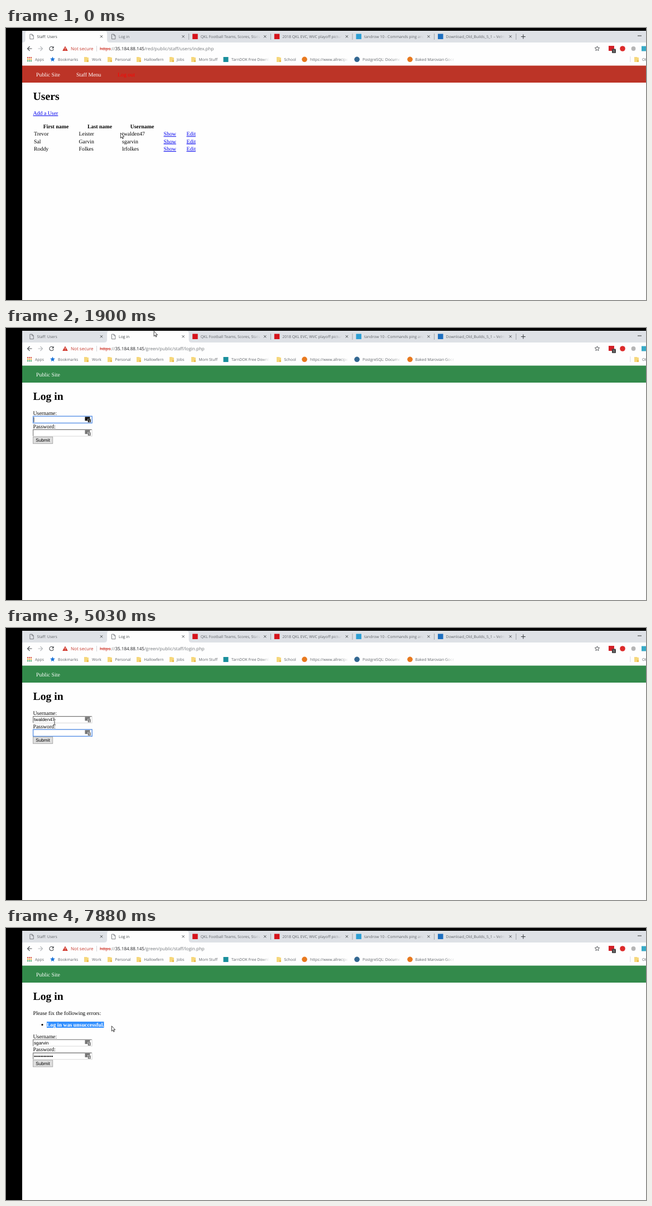
These frames come from a looping animation (1147 px wide and 488 px high, 8000 ms). An HTML page:

```html
<!DOCTYPE html>
<html lang="en">
<head>
<meta charset="utf-8">
<title>Staff login</title>
<style>
  html, body { margin: 0; width: 100%; height: 100%; overflow: hidden; background: #000; }
  svg { display: block; }
  #stage { width: 100%; height: 100%; }
  text { text-rendering: geometricPrecision; white-space: pre; }
  .ui { font-family: "Open Sans", "Noto Sans", sans-serif; }
  .page { font-family: "Liberation Serif", "Times New Roman", serif; }
  .field { font-family: "Liberation Sans", Arial, sans-serif; }
  .bold { font-weight: bold; }
  .link { text-decoration: underline; }
</style>
</head>
<body>
<svg id="stage" viewBox="0 0 1147 488"></svg>
<script>
const LOOP = 8000;
const BODY = 9.86, FIELD = 8.2, TAB = 6.85, MARK = 6.9, URL_SIZE = 8.06;
const SELECT = '#3390ff', GREY = '#5f6368';
const LOGIN_USER = 'twalden47', SAVED_USER = 'sgarvin';
const ERROR = 'Log in was unsuccessful.';

const TABS = [
  ['', 'Staff: Users'],
  ['', 'Log in'],
  ['#d5131b', 'QKL Football Teams, Scores, Stats'],
  ['#d5131b', '2018 QKL EVC, WVC playoff picture'],
  ['#2e9fd4', 'tandrow 10 - Commands ping and'],
  ['#1c6fc0', 'Download_Old_Builds_5_1 – Velmor'],
];
const FOLDERS = [[140, 154, 'Work'], [182, 195.5, 'Personal'], [234, 247.5, 'Hallowfern'],
  [293, 306, 'Jobs'], [332, 345.5, 'Mom Stuff'], [485, 498.5, 'School'], [1126, 1140, 'Other']];
const SITES = [[394, 404, '#1a8f9c', 'TarnDOK Free Downloads', 0],
  [535, 545, '#e8791e', 'https://www.allrecipes.com', 1],
  [629, 639, '#336791', 'PostgreSQL: Documentation', 1],
  [724, 733.5, '#e8791e', 'Baked Marovian Goose Rec', 1]];
const COLUMNS = [50, 130.5, 208, 282.5, 323.5];
const ROWS = [['Trevor', 'Leister', LOGIN_USER], ['Sal', 'Garvin', SAVED_USER], ['Roddy', 'Folkes', 'lrfolkes']];
// Pointer keys: time, x, y
const POINTER = [[0, 205, 188], [120, 205, 188], [420, 250, 213], [720, 250, 213], [900, 260, 215],
  [1760, 265, 5], [1900, 265, 5], [2530, 87, 169], [7050, 87, 169], [7610, 73, 173],
  [7760, 125, 173], [7880, 189, 175.5]];

const stage = document.getElementById('stage');
const pen = document.createElement('canvas').getContext('2d');
const textWidth = (text, size, family) => {
  pen.font = `${size}px ${family}`;
  return pen.measureText(text).width;
};
const serifWidth = s => textWidth(s, BODY, '"Liberation Serif", "Times New Roman", serif');
const sansWidth = s => textWidth(s, FIELD, '"Liberation Sans", Arial, sans-serif');

const rect = (x, y, w, h, fill, extra = '') =>
  `<rect x="${x}" y="${y}" width="${w}" height="${h}" fill="${fill}" ${extra}/>`;
const circle = (x, y, r, fill, extra = '') => `<circle cx="${x}" cy="${y}" r="${r}" fill="${fill}" ${extra}/>`;
const line = (d, color, width = 1) =>
  `<path d="${d}" fill="none" stroke="${color}" stroke-width="${width}"/>`;
const text = (x, y, s, size, cls, fill = '#000', extra = '') =>
  `<text x="${x}" y="${y}" font-size="${size}" class="${cls}" fill="${fill}" ${extra}>${s}</text>`;
const page = (x, y, s, fill, cls = '') => text(x, y, s, BODY, 'page ' + cls, fill);
const clip = (x, y, w, h, inner) =>
  `<svg x="${x}" y="${y}" width="${w}" height="${h}" viewBox="${x} ${y} ${w} ${h}">${inner}</svg>`;
const fadedText = (x, y, w, s, size, fill, fade) =>
  clip(x, y - 9, w, 12, text(x, y, s, size, 'ui', fill) + rect(x + w - 14, y - 9, 14, 12, `url(#${fade})`));
const cross = (x, y, r, color, width) =>
  line(`M${x - r} ${y - r}l${2 * r} ${2 * r}m0 ${-2 * r}l${-2 * r} ${2 * r}`, color, width);
const star = (x, y, r) => Array.from({ length: 10 }, (_, i) => {
  const a = i * Math.PI / 5, d = i % 2 ? r * 0.45 : r;
  return `${x + d * Math.sin(a)},${y - d * Math.cos(a)}`;
}).join(' ');
const fade = (id, color) => `<linearGradient id="${id}"><stop stop-color="${color}" stop-opacity="0"/>
  <stop offset="1" stop-color="${color}"/></linearGradient>`;

function tabStrip(t, active) {
  const waiting = t >= 6550 && t < 6970, loading = waiting && t >= 6710;
  let out = rect(29, 5, 1118, 21, '#dee1e6');
  TABS.forEach(([color, title], i) => {
    const x = 34.5 + 146.6 * i, on = i === active;
    if (on) out += `<path d="M${x - 5} 26q5 0 5-5V10q0-5 5-5h136.6q5 0 5 5v11q0 5 5 5z" fill="#fefefe"/>`;
    else if (i + 1 !== active) out += rect(x + 146.2, 10, 0.8, 11, '#8f9399');
    if (i === 1 && waiting) {
      out += `<g transform="rotate(${(t - 6830) * 0.36} ${x + 11.5} 15.5)">` +
        line(`M${x + 8.3} 14a3.6 3.6 0 0 1 6.8 1.5`, loading ? '#4a7fdc' : '#8a8f96', 1.1) + '</g>';
    } else if (color) out += rect(x + 6.5, 10.5, 9.5, 9.5, color);
    else out += line(`M${x + 8.4} 11.2h4l2.4 2.4v6.2h-6.4zM${x + 12.2} 11.2v2.6h2.6`, GREY, 0.8);
    const label = i === 1 && loading ? 'https://35.184.88.145/green/public' : title;
    out += fadedText(x + 21, 17.8, 106, label, TAB, on ? '#3c4043' : GREY, on ? 'fadeLight' : 'fadeStrip');
    out += cross(x + 136.5, 15.3, 2.1, '#3c4043', 0.9);
  });
  return out + line('M923 15.5h8m-4-4v8', '#3c4043', 1.1) + rect(1132, 13.5, 7, 1, '#333');
}

function toolbar(t, active) {
  const ink = '#4a4d51';
  const stop = t >= 6550 && t < 6970;
  const path = active ? '/green/public/staff/login.php' : '/red/public/staff/users/index.php';
  let out = rect(29, 26, 1118, 42, '#fefefe');
  out += line('M46.5 37h-8m4-4l-4 4l4 4', ink, 1.1) + line('M57.5 37h8m-4-4l4 4l-4 4', '#b4b7bb', 1.1);
  out += stop ? cross(81.5, 37, 3.4, ink, 1.1)
    : line('M84.4 34.5a3.7 3.7 0 1 0 .8 3.5', ink, 1.1) + `<path d="M85.7 32.5v3.9h-3.9z" fill="${ink}"/>`;
  out += '<path d="M106 32.5l4.8 8.5h-9.6z" fill="#cf3327"/>' + rect(105.5, 35.3, 1, 2.8, '#fff') + rect(105.5, 38.8, 1, 1, '#fff');
  out += text(116, 40, 'Not secure', URL_SIZE, 'ui', '#c5392d') + rect(162, 32, 0.8, 10, '#c9ccd0');
  out += text(168, 40, `<tspan fill="#cf3327">https</tspan><tspan fill="#777">://</tspan>` +
    `<tspan fill="#202124">35.184.88.145</tspan>${path}`, URL_SIZE, 'ui', '#73777b');
  out += rect(168, 37.2, 20, 0.8, '#cf3327');
  out += `<polygon points="${star(1059.5, 37, 4.4)}" fill="none" stroke="${ink}" stroke-width=".9"/>`;
  out += rect(1080, 32, 10, 9, '#d32027') + rect(1086, 37.5, 7, 7.5, '#444', 'rx="1"') +
    text(1088, 43.5, '1', 6, 'ui', '#fff');
  out += circle(1105, 37, 4.8, '#dd2a2a') + circle(1124.5, 37, 3.9, '#b6b6b6') + rect(1139, 32.5, 8, 9, '#37a9c5');
  return out + bookmarks();
}

function bookmarks() {
  const y = 58.8, dots = ['#d9483b', '#e0a128', '#3d9a57'];
  let out = text(52, y, 'Apps', MARK, 'ui', GREY) + text(93, y, 'Bookmarks', MARK, 'ui', GREY);
  for (let i = 0; i < 9; i++) out += rect(38 + i % 3 * 3, 52 + Math.floor(i / 3) * 3, 2, 2, dots[Math.floor(i / 3)]);
  out += `<polygon points="${star(83.5, 56.3, 4.7)}" fill="#1a73d8"/>`;
  for (const [ix, x, name] of FOLDERS)
    out += `<path d="M${ix} 52h5l1 1h2v8h-8z" fill="#f6d77c"/>` + rect(ix + 5, 57.5, 3, 3.5, '#e8bd4f') +
      text(x, y, name, MARK, 'ui', GREY);
  for (const [cx, x, color, name, round] of SITES)
    out += (round ? circle(cx, 56.3, 4.8, color) : rect(cx - 4.5, 52, 9, 9, color)) +
      fadedText(x, y, 68, name, MARK, GREY, 'fadeLight');
  return out + rect(1118.5, 51, 0.8, 10, '#d0d3d7');
}

function usersPage(t) {
  const last = t < 120 || t >= 900 ? -1 : t < 270 ? 4 : t < 420 ? 9 : 12;
  let out = rect(29, 67.5, 1118, 30.5, '#bc3427');
  out += page(54, 86.5, 'Public Site', '#fff') + page(126, 86.5, 'Staff Menu', '#fff') + page(200, 86.5, 'Log out', '#f00');
  out += text(48.5, 129, 'Users', BODY * 2, 'page bold') + page(48.5, 156, 'Add a User', '#00e', 'link');
  [[89.5, 'First name'], [168, 'Last name'], [244, 'Username']].forEach(([x, s]) =>
    out += text(x, 179.7, s, BODY, 'page bold', '#000', 'text-anchor="middle"'));
  ROWS.forEach((row, r) => [...row, 'Show', 'Edit'].forEach((s, c) => {
    const x = COLUMNS[c], y = 193.2 + 13.4 * r, index = r * 5 + c;
    const picked = index >= 2 && index <= last;
    if (picked) out += rect(x, y - 8.8, serifWidth(s) + (c === 4 ? 2.5 : 0), 11.3, SELECT);
    out += page(x, y, s, picked ? '#fff' : c > 2 ? '#00e' : '#000', c > 2 ? 'link' : '');
  }));
  return out;
}

// style: 'focus', 'inset' or 'plain'; badge: colour of the fill-in button, if any
function input(y, value, style, badge, caret) {
  let out = rect(48.5, y + 0.5, 105.6, 11.8, '#fff', `stroke="${style === 'inset' ? '#d4d4d4' : '#a9a9a9'}" stroke-width=".9"`);
  if (style === 'inset') out += line(`M48.6 ${y + 12}v-11.4h105`, '#777', 1.1);
  if (style === 'focus') out += rect(48.6, y + 0.3, 105.6, 12.2, '#fff', 'stroke="#5c93e6" stroke-width="1.4"');
  if (badge) out += rect(141.5, y + 1.4, 9, 7, badge) +
    rect(146.5, y + 5.2, 5.5, 6.3, badge, 'stroke="#fff" stroke-width=".5"') +
    text(148, y + 10.6, '1', 5, 'ui bold', '#fff');
  out += text(50, y + 9.1, value, FIELD, 'field');
  if (caret) out += rect(50 + sansWidth(value) - 0.4, y + 2, 0.8, 9, '#000');
  return out;
}

function loginPage(t) {
  const failed = t >= 6710, filled = t >= 7000, onPassword = t >= 4360;
  const shift = failed ? 41.7 : 0;
  const keys = t < 3240 ? 0 : 1 + Math.floor((t - 3240) / 135);
  const dots = t < 5600 ? 0 : Math.min(6, 1 + Math.floor((t - 5600) / 155));
  let user = keys >= 8 ? LOGIN_USER : LOGIN_USER.slice(0, keys);
  if (filled) user = SAVED_USER;
  const secret = '•'.repeat(filled ? 12 : failed ? 0 : dots);
  const idle = failed && !filled ? 'plain' : 'inset';
  const badge = failed && !filled ? '' : '#777';
  const userCaret = !onPassword && (t < 2400 || t >= 2930);
  const secretCaret = onPassword && !failed && (t < 5030 || t >= 5600);

  let out = rect(29, 67.5, 1118, 30.5, '#338a4b') + page(54, 86.5, 'Public Site', '#fff');
  out += text(48.5, 129, 'Log in', BODY * 2, 'page bold');
  if (failed) {
    out += page(48.5, 156, 'Please fix the following errors:') + circle(65, 173.6, 1.6, '#000');
    out += page(73, 176.7, ERROR, '#000', 'bold');
    const picked = t >= 7880 ? 102.7 : t >= 7760 ? 52 : 0;
    if (picked) out += clip(73, 168, picked, 11, rect(73, 168, picked, 11, SELECT) + page(73, 176.7, ERROR, '#fff', 'bold'));
  }
  out += `<g transform="translate(0 ${shift})">` + page(48.5, 156, 'Username:') + page(48.5, 179.7, 'Password:');
  out += input(158, user, onPassword ? idle : 'focus', onPassword ? badge : '#111', userCaret);
  out += input(181.8, secret, onPassword && !failed ? 'focus' : idle, badge, secretCaret);
  out += rect(48.5, 195.3, 35.2, 12, '#dedede', 'stroke="#a2a2a2" stroke-width=".9"');
  return out + text(53.3, 204.3, 'Submit', FIELD, 'field') + '</g>';
}

function pointer(t) {
  let i = POINTER.findIndex(key => key[0] > t);
  if (i < 0) i = POINTER.length;
  const [t0, x0, y0] = POINTER[i - 1], [t1, x1, y1] = POINTER[i] || [LOOP, x0, y0];
  const k = (t - t0) / (t1 - t0), x = x0 + (x1 - x0) * k, y = y0 + (y1 - y0) * k;
  if (t >= 2450 && t < 7880)
    return line(`M${x - 2} ${y - 4.7}h1.5l.5 .5l.5-.5h1.5M${x} ${y - 4.5}v9M${x - 2} ${y + 4.7}h1.5l.5-.5l.5 .5h1.5`, '#222', 0.8);
  return `<path d="M${x + 0.4} ${y + 0.3}v9.3l2.1-2l1.4 3.2l1.4-.6l-1.4-3.1h2.9z" fill="#fff" stroke="#111" stroke-width=".8"/>`;
}

function scene(t) {
  const active = t < 1900 ? 0 : 1;
  return `<defs>${fade('fadeLight', '#fefefe')}${fade('fadeStrip', '#dee1e6')}</defs>` +
    rect(0, 0, 1147, 488, '#000') + rect(29, 5, 1118, 483, '#fefefe') +
    tabStrip(t, active) + toolbar(t, active) + (active ? loginPage(t) : usersPage(t)) + pointer(t);
}

const start = performance.now();
let shown = '';
function frame() {
  const markup = scene((performance.now() - start) % LOOP);
  if (markup !== shown) stage.innerHTML = shown = markup;
  requestAnimationFrame(frame);
}
frame();
</script>
</body>
</html>
```
